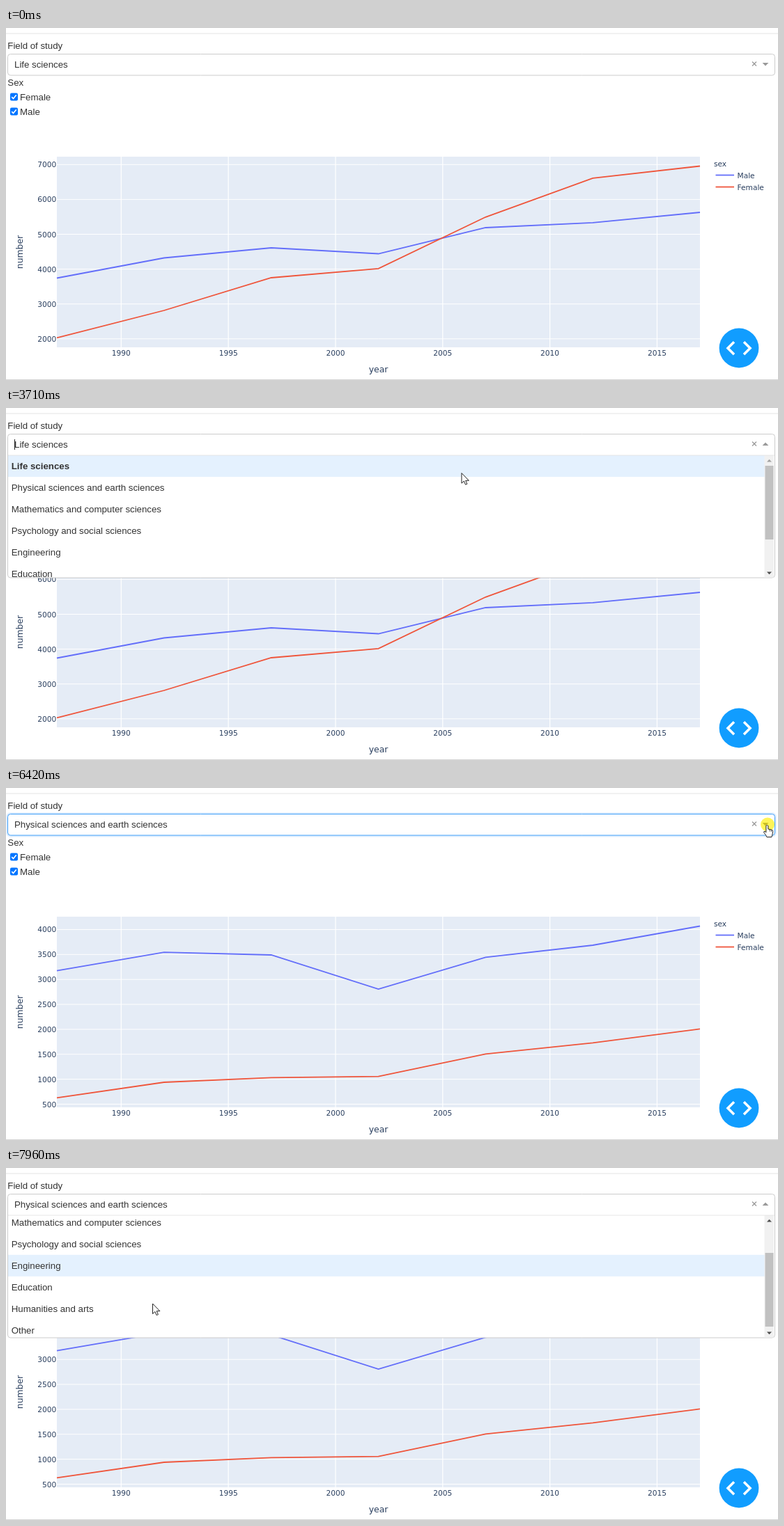
An HTML page with a canvas for the animation above (8000 ms loop, 1108 by 506 pixels).

```html
<!DOCTYPE html>
<html lang="en">
<head>
<meta charset="utf-8">
<title>Field of study chart</title>
<style>
  html, body { margin: 0; width: 100%; height: 100%; overflow: hidden; background: #fff; }
  canvas { display: block; }
</style>
</head>
<body>
<canvas id="stage" width="1108" height="506"></canvas>
<script>
const ctx = document.getElementById('stage').getContext('2d');
const LOOP = 8000;
const UI = '13.28px "Liberation Sans", Arial, sans-serif';
const TICK = '10.62px "DejaVu Sans", Verdana, sans-serif';
const TITLE = '12.4px "DejaVu Sans", Verdana, sans-serif';
const INK = '#2a3f5f', BLUE = '#636efa', RED = '#ef553b';
const PLOT = { x: 73, y: 185, w: 923, h: 274 };

const fields = ['Life sciences', 'Physical sciences and earth sciences',
  'Mathematics and computer sciences', 'Psychology and social sciences',
  'Engineering', 'Education', 'Humanities and arts', 'Other'];

// Tick values with the height of the first one, and line heights every five years
const charts = [
  { first: 2000, step: 1000, count: 6, base: 446.8, gap: 50.1,
    male: [359.5, 330.5, 316, 324.5, 287, 279.8, 265],
    female: [445.3, 406, 359, 345.8, 271.8, 215.8, 198.5] },
  { first: 500, step: 500, count: 8, base: 454.5, gap: 35.86,
    male: [262.7, 236.2, 240, 289, 243.3, 226, 198.5],
    female: [445.3, 423, 416.3, 414.6, 382.3, 366.3, 346.4] }
];

// Pointer moves: start, end, steps, target x, target y, easing
const smooth = p => p * p * (3 - 2 * p);
const linear = p => p;
const slowing = p => p * (2 - p);
const moves = [
  [290, 1080, 11, 770, 273, smooth],
  [1160, 1850, 10, 1033, 44, smooth],
  [2000, 2080, 2, 1067, 52, linear],
  [2250, 2480, 4, 1079, 54, linear],
  [2860, 2860, 1, 1087, 51, linear],
  [2940, 2940, 1, 1093, 51, linear],
  [3330, 3960, 9, 339, 124, smooth],
  [5110, 5880, 11, 983, 58, smooth],
  [5960, 6340, 6, 1092, 53, slowing],
  [6650, 6800, 3, 840, 97, linear],
  [6880, 7420, 8, 212, 182, slowing],
  [7650, 7650, 1, 211, 190, linear],
  [7730, 7730, 1, 210, 195, linear]
];

const arrowShape = new Path2D('M0 0V14.6L3.4 11.5 5.6 16.6 7.9 15.6 5.7 10.7H10.4Z');
const handShape = new Path2D('M-1.6 1.3Q0-.6 1.4 1.3V6L6.2 7Q8.4 7.6 8.2 9.8L7.4 13.8 6.4 17.5H-.6Q-1.4 14.8-4.6 11.2-5.4 9.2-3.4 9.3L-1.6 10.8Z');
const toolIcons = ['M0 3H3L4 1H8L9 3H12V11H0ZM4 7A2 2 0 1 0 8 7A2 2 0 1 0 4 7', 'M1 5A4 4 0 1 0 9 5A4 4 0 1 0 1 5M8 8L12 12',
  'M6 0V12M0 6H12M4 2L6 0 8 2M4 10L6 12 8 10', 'M1 1H11V11H1Z', 'M3 11Q0 5 5 3T11 5 5 8',
  'M1 1H11V11H1ZM6 3V9M3 6H9', 'M1 1H11V11H1ZM3 6H9', 'M0 4V0H4M8 0H12V4M12 8V12H8M4 12H0V8M4 4H8V8H4Z',
  'M0 6L6 1 12 6M2 6V11H10V6', 'M1 1V11H11M1 5H6V11', 'M1 3H8L11 6 8 9H1Z', 'M1 1H9L11 3 9 5H1ZM1 7H9L11 9 9 11H1Z'
].map(d => new Path2D(d));

const between = (t, a, b) => t >= a && t < b;

function fillRect(x, y, w, h, color) {
  ctx.fillStyle = color;
  ctx.fillRect(x, y, w, h);
}

function text(str, x, y, font = UI, color = '#333', align = 'left') {
  ctx.font = font;
  ctx.fillStyle = color;
  ctx.textAlign = align;
  ctx.fillText(str, x, y);
}

function line(points, color, width) {
  ctx.beginPath();
  points.forEach(([x, y]) => ctx.lineTo(x, y));
  ctx.strokeStyle = color;
  ctx.lineWidth = width;
  ctx.stroke();
}

function disc(x, y, r, color) {
  ctx.beginPath();
  ctx.arc(x, y, r, 0, 7);
  ctx.fillStyle = color;
  ctx.fill();
}

function triangle(x, y, half, height, color) {
  ctx.beginPath();
  ctx.moveTo(x - half, y);
  ctx.lineTo(x + half, y);
  ctx.lineTo(x, y + height);
  ctx.fillStyle = color;
  ctx.fill();
}

function box(x, y, w, h, radius, fill, stroke, width = 1) {
  ctx.beginPath();
  ctx.roundRect(x, y, w, h, radius);
  if (fill) { ctx.fillStyle = fill; ctx.fill(); }
  if (stroke) { ctx.strokeStyle = stroke; ctx.lineWidth = width; ctx.stroke(); }
}

function pointerAt(t) {
  let x = 452, y = 461;
  for (const [start, end, steps, tx, ty, ease] of moves) {
    if (t < start) break;
    const done = Math.min(steps, 1 + Math.floor((t - start + 4) * (steps - 1) / (end - start || 1)));
    const p = ease(done / steps);
    x += (tx - x) * p;
    y += (ty - y) * p;
  }
  return { x, y };
}

function drawChart({ first, step, count, base, gap, male, female }) {
  fillRect(PLOT.x, PLOT.y, PLOT.w, PLOT.h, '#e5ecf6');
  for (let i = 0; i < 6; i++) {
    const x = 165.3 + i * 153.83;
    line([[x, PLOT.y], [x, PLOT.y + PLOT.h]], '#fff', 1.2);
    text(1990 + i * 5, x, 470.8, TICK, INK, 'center');
  }
  for (let i = 0; i < count; i++) {
    const y = base - i * gap;
    line([[PLOT.x, y], [PLOT.x + PLOT.w, y]], '#fff', 1);
    text(first + i * step, 72.2, y + 4, TICK, INK, 'right');
  }
  const series = (ys, color) => line(ys.map((y, i) => [PLOT.x + i * PLOT.w / 6, y]), color, 1.8);
  series(male, BLUE);
  series(female, RED);

  text('year', 534.5, 494.5, TITLE, INK, 'center');
  ctx.save();
  ctx.translate(23.5, 322);
  ctx.rotate(-Math.PI / 2);
  text('number', 0, 0, TITLE, INK, 'center');
  ctx.restore();

  text('sex', 1016, 198.5, TICK, INK);
  [['Male', BLUE], ['Female', RED]].forEach(([name, color], i) => {
    const y = 211.5 + i * 17;
    line([[1018.5, y], [1045, y]], color, 1.8);
    text(name, 1049.5, y + 4, TICK, INK);
  });
}

function drawToolbar() {
  ctx.strokeStyle = 'rgba(68,68,68,.3)';
  ctx.lineWidth = 1.6;
  toolIcons.forEach((icon, i) => {
    ctx.save();
    ctx.translate(848 + i * 19.6, 139);
    ctx.stroke(icon);
    ctx.restore();
  });
  fillRect(1084, 139, 12, 12, 'rgba(68,68,68,.3)');
}

function drawCheckbox(name, y, hovered) {
  box(6, y - 5.5, 11, 11, 2, hovered ? '#005cc8' : '#0075ff');
  line([[8.2, y + .2], [10.5, y + 2.5], [14.8, y - 2.8]], '#fff', 1.7);
  text(name, 20, y + 5.3);
}

function drawMenu(focused, selected, scroll) {
  box(2.5, 37.5, 1101, 206.5, 4, '#fff', '#ccc');
  ctx.save();
  ctx.beginPath();
  ctx.rect(3, 68, 1099, 175.5);
  ctx.clip();
  fields.forEach((name, i) => {
    const y = 68 + i * 30.95 - scroll;
    if (i === focused) fillRect(3, y, 1086, 31, '#e4f1fe');
    text(name, 7.7, y + 20, i === selected ? 'bold ' + UI : UI);
  });
  fillRect(1088.5, 68, 14, 176, '#f1f1f1');
  fillRect(1089.5, 83 + scroll * 39 / 67, 12, 106, '#c1c1c1');
  triangle(1095.5, 77.5, 3.5, -3.8, scroll ? '#505050' : '#a3a3a3');
  triangle(1095.5, 235.5, 3.5, 3.8, '#505050');
  ctx.restore();
  line([[3, 68], [1103, 68]], '#e6e6e6', 1);
}

function drawPointer({ x, y }, kind) {
  if (kind === 'cross') {
    line([[x - 9, y], [x + 9, y]], '#333', 1);
    line([[x, y - 9], [x, y + 9]], '#333', 1);
    return;
  }
  const shape = kind === 'hand' ? handShape : arrowShape;
  ctx.save();
  ctx.translate(x + .5, y);
  ctx.fillStyle = '#fff';
  ctx.fill(shape);
  ctx.strokeStyle = '#222';
  ctx.lineWidth = 1;
  ctx.stroke(shape);
  if (kind === 'hand') {
    line([[3.7, 7], [3.7, 9.5]], '#222', .8);
    line([[6, 7.5], [6, 9.8]], '#222', .8);
  }
  ctx.restore();
}

function draw(t) {
  const pointer = pointerAt(t), { x, y } = pointer;
  const present = t >= 290;
  const open = between(t, 3330, 4570) || t >= 6490;
  const focus = between(t, 4570, 6490);
  const pressed = between(t, 3180, 3330) || between(t, 4420, 4570) || between(t, 6420, 6490);
  const selected = t < 4570 ? 0 : 1;
  const page = present && !open;
  const overButtons = present && x >= 1065 && between(y, 37, 68);

  fillRect(0, 0, 1108, 506, '#fff');
  fillRect(0, 7.5, 1108, 1, '#e3e3e3');
  fillRect(0, 505, 1108, 1, '#d5d5d5');
  drawChart(charts[t < 4650 ? 0 : 1]);
  if (page && y > 125) drawToolbar();

  disc(1052, 460, 28.4, '#119dff');
  for (const side of [-1, 1]) {
    line([[1052 + side * 7, 451.3], [1052 + side * 16, 460.3], [1052 + side * 7, 469.3]], '#fff', 3.6);
  }

  text('Field of study', 2.3, 30);
  text('Sex', 2.3, 83);
  drawCheckbox('Female', 99, page && between(y, 89, 110));
  drawCheckbox('Male', 120, page && between(y, 110, 131));

  if (open) {
    const focused = y < 68 ? selected : Math.floor((y - 68) / 31);
    const p = Math.max(0, Math.min(3, Math.floor((t - 7722) / 78))) / 3;
    drawMenu(focused, selected, 67 * smooth(p));
  } else {
    if (focus) box(2.5, 37.5, 1101, 30.5, 4, null, 'rgba(0,126,255,.12)', 5);
    box(2.5, 37.5, 1101, 30.5, 4, '#fff', focus ? '#409ff7' : '#ccc');
  }
  text(fields[selected], 12, 57);
  if (open && (t - (t < 5000 ? 3330 : 6460)) % 1000 < 500) fillRect(12, 45, 1, 15, '#222');

  const cross = overButtons && x < 1082 ? '#d0021b' : '#999';
  line([[1071, 48.5], [1077, 54.5]], cross, 1.3);
  line([[1077, 48.5], [1071, 54.5]], cross, 1.3);
  const caret = overButtons && x >= 1082 ? '#666' : '#999';
  triangle(1090, open ? 54 : 50, 4.4, open ? -4.4 : 4.4, caret);

  if (pressed) disc(x + 1, y - .5, 10, 'rgba(255,238,0,.65)');
  if (present) {
    const inPlot = page && between(x, 73, 996) && between(y, 185, 459);
    drawPointer(pointer, inPlot ? 'cross' : overButtons ? 'hand' : 'arrow');
  }
}

const began = performance.now();
function tick() {
  draw((performance.now() - began) % LOOP);
  requestAnimationFrame(tick);
}
tick();
</script>
</body>
</html>
```
